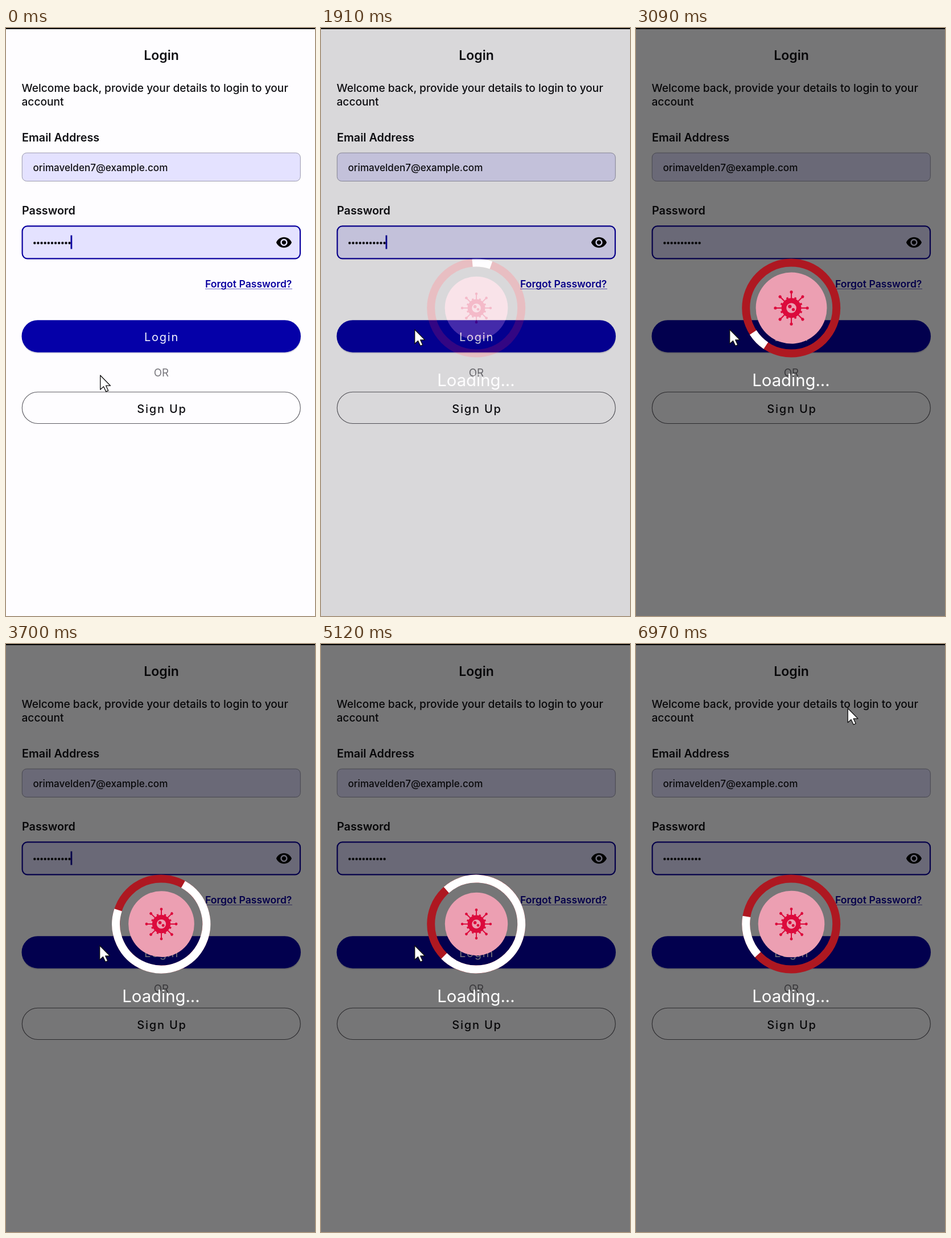
Write an HTML page that moves like this. It is 543 by 1031 pixels and loops after 7000 ms.

```html
<!DOCTYPE html>
<html lang="en">
<head>
<meta charset="utf-8">
<title>Login</title>
<style>
  html, body { margin: 0; width: 100%; height: 100%; overflow: hidden; background: #fefdff; }
  svg { display: block; width: 543px; height: 1031px; }
  text { font-family: Inter, Roboto, sans-serif; fill: #101014; }
  .mid { text-anchor: middle; }
  .label { font-size: 19.8px; font-weight: 600; }
  .body { font-size: 19.15px; font-weight: 500; }
  .button { font-size: 20px; letter-spacing: 1.8px; }
</style>
</head>
<body>
<svg viewBox="0 0 543 1031">
  <rect width="543" height="1031" fill="#fefdff"/>

  <text class="mid" x="273" y="56" font-size="23" font-weight="600">Login</text>
  <text class="body" x="27.5" y="112">Welcome back, provide your details to login to your</text>
  <text class="body" x="27.5" y="136">account</text>

  <text class="label" x="28" y="199">Email Address</text>
  <rect x="28.3" y="219" width="489" height="49.5" rx="8" fill="#e4e2ff" stroke="#9a99ac"/>
  <text x="47.5" y="251" font-size="17.1" font-weight="500">orimavelden7@example.com</text>

  <text class="label" x="28" y="327">Password</text>
  <rect x="28.6" y="347.3" width="488.4" height="57" rx="9" fill="#e4e2ff" stroke="#0a00a0" stroke-width="2.2"/>
  <g id="dots" fill="#101014"></g>
  <rect id="caret" x="113.5" y="363.5" width="2.8" height="24" fill="#0a00a0"/>
  <path transform="translate(473.7 361.2) scale(1.23)" d="M12 4.5C7 4.5 2.73 7.61 1 12c1.73 4.39 6 7.5 11 7.5s9.27-3.11 11-7.5c-1.73-4.39-6-7.5-11-7.5zM12 17c-2.76 0-5-2.24-5-5s2.24-5 5-5 5 2.24 5 5-2.24 5-5 5zm0-8c-1.66 0-3 1.34-3 3s1.34 3 3 3 3-1.34 3-3-1.34-3-3-3z"/>

  <text x="350" y="455" font-size="17.6" font-weight="600" style="fill:#0a00a0">Forgot Password?</text>
  <path d="M350 457.5H503" stroke="#0a00a0" opacity=".6"/>

  <rect x="28" y="515" width="490" height="55.5" rx="27.7" fill="#d9d8e2"/>
  <rect x="27.5" y="512.2" width="490.5" height="56.5" rx="28.2" fill="#0500a8"/>
  <text class="mid button" x="273.5" y="549" style="fill:#f4f3ff">Login</text>
  <text class="mid" x="273" y="611" font-size="18.7" style="fill:#77767c">OR</text>
  <rect x="28.3" y="638.3" width="489" height="55.2" rx="27.6" fill="none" stroke="#5c5b62" stroke-width="1.1"/>
  <text class="mid button" x="274" y="674.5" font-weight="500">Sign Up</text>

  <g id="dialog" opacity="0">
    <rect width="543" height="1031" fill="#000" opacity=".535"/>
    <g transform="translate(272.7 491)" fill="none" stroke-width="14">
      <circle r="79.5" stroke="#ae1821"/>
      <path id="arc" stroke="#fff"/>
    </g>
    <g id="badge">
      <circle r="70" fill="#ec9fb2"/>
      <g id="virus" fill="#dc0a3c" stroke="#dc0a3c"></g>
    </g>
    <text class="mid" x="272.5" y="628" font-size="29.3" style="fill:#fff">Loading...</text>
  </g>

  <rect width="543" height="2" fill="#000"/>
  <path id="pointer" d="M0 0V25L5.8 19.8L10 28.6L14 26.8L10 18.2H17.8Z" fill="#fff" stroke="#111" stroke-width="1.3" stroke-linejoin="round"/>
</svg>

<script>
const LOOP = 7000, SHOW = 1857;
const $ = id => document.getElementById(id);
const clamp = v => Math.min(1, Math.max(0, v));
const span = (t, from, length) => clamp((t - from) / length);
const smooth = p => p * p * (3 - 2 * p);

function add(parent, tag, attrs) {
  const el = document.createElementNS("http://www.w3.org/2000/svg", tag);
  for (const key in attrs) el.setAttribute(key, attrs[key]);
  parent.append(el);
}

// cubic-bezier(.4, 0, .2, 1)
function fastOutSlowIn(x) {
  let lo = 0, hi = 1;
  for (let i = 0; i < 24; i++) {
    const u = (lo + hi) / 2, v = 1 - u;
    if (1.2 * v * v * u + 0.6 * v * u * u + u * u * u < x) lo = u; else hi = u;
  }
  return lo * lo * (3 - 2 * lo);
}

for (let i = 0; i < 11; i++) add($("dots"), "circle", { cx: 50.3 + 6.13 * i, cy: 377, r: 2.2 });

const virus = $("virus");
for (let i = 0; i < 8; i++) {
  const turn = `rotate(${i * 45})`;
  add(virus, "path", { d: "M0 -16V-31", "stroke-width": 2.4, transform: turn });
  add(virus, "circle", { cy: -31.5, r: 2.9, stroke: "none", transform: turn });
  add(virus, "path", { d: "M0 -16V-22.5", "stroke-width": 4, transform: `rotate(${i * 45 + 22.5})` });
}
add(virus, "circle", { r: 19.5, stroke: "none" });
add(virus, "circle", { r: 9.8, fill: "#ec9fb2", stroke: "none" });
add(virus, "circle", { cx: -3, cy: -3, r: 3.5, stroke: "none" });
add(virus, "circle", { cx: 3.8, cy: 3, r: 3, stroke: "none" });

function ringPoint(deg) {
  const a = deg * Math.PI / 180;
  return `${79.5 * Math.sin(a)} ${-79.5 * Math.cos(a)}`;
}

// Four grow-and-shrink cycles on top of a steady rotation.
function drawArc(t) {
  const turn = t * 1520 / 5400;
  let start = turn - 20, end = turn;
  for (let i = 0; i < 4; i++) {
    end += 250 * fastOutSlowIn(span(t, 1350 * i, 667));
    start += 250 * fastOutSlowIn(span(t, 1350 * i + 667, 667));
  }
  $("arc").setAttribute("d",
    `M${ringPoint(start)}A79.5 79.5 0 ${end - start > 180 ? 1 : 0} 1 ${ringPoint(end)}`);
}

function drawPointer(t) {
  const press = smooth(span(t, 550, 450));
  const leave = smooth(span(t, 6400, 500));
  const x = 165.7 - press + 207.5 * leave;
  const y = 609 - 80.3 * press - 416 * leave;
  $("pointer").setAttribute("transform", `translate(${x} ${y})`);
}

function draw(t) {
  const shown = Math.max(0, t - SHOW);
  $("caret").setAttribute("opacity", Math.floor((t + 400) / 1000) % 2 ? 0 : 1);
  $("dialog").setAttribute("opacity", span(shown, 0, 200));
  drawArc(shown);
  const pulse = (1 - Math.cos(Math.PI * shown / 812)) / 2;
  $("badge").setAttribute("transform", `translate(273 491) scale(${(55.2 + 15.4 * pulse) / 70})`);
  drawPointer(t);
}

const begin = performance.now();
function tick() {
  draw((performance.now() - begin) % LOOP);
  requestAnimationFrame(tick);
}
tick();
</script>
</body>
</html>
```
